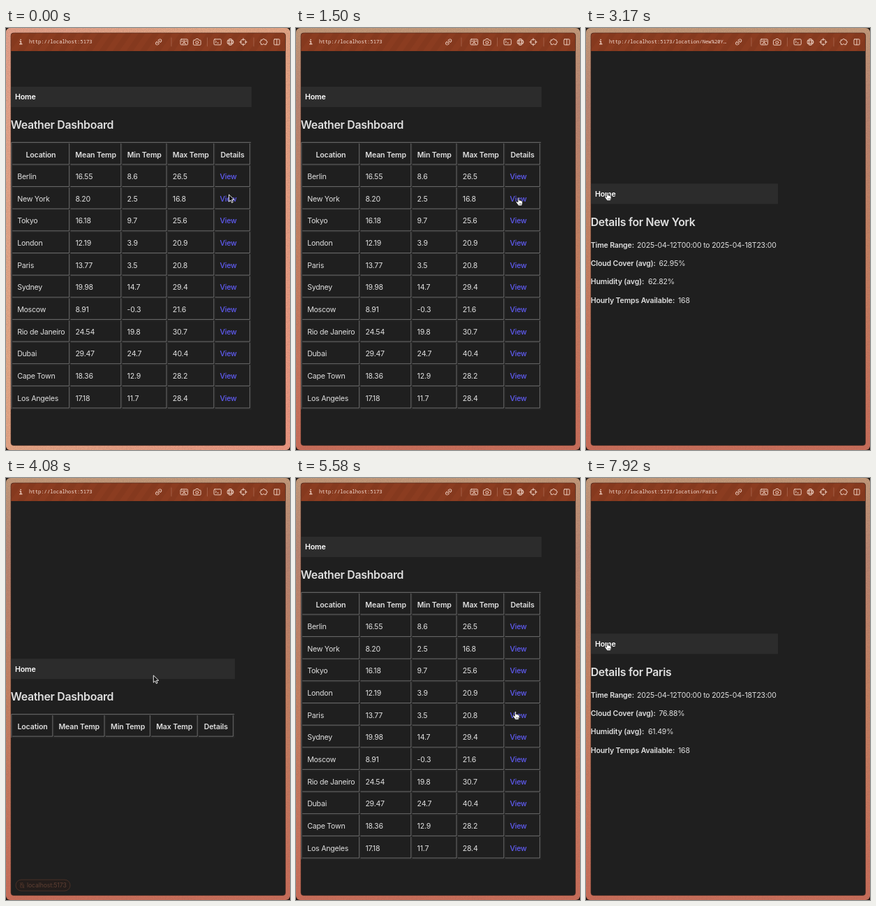
Animation, 407 px wide and 603 px high, one loop 8 s. Source, as an HTML page:

```html
<!DOCTYPE html>
<html lang="en">
<head>
<meta charset="utf-8">
<title>Weather Dashboard</title>
<style>
  html, body { margin: 0; width: 100%; height: 100%; overflow: hidden; background: #161210; }
  svg { display: block; width: 407px; height: 603px; }
  text { font-family: Inter, "Open Sans", sans-serif; font-size: 10.56px; fill: #e0e0e0; letter-spacing: -.02em; white-space: pre; }
  .bold { font-weight: 600; letter-spacing: -.012em; }
  .title { font-size: 15.84px; font-weight: 600; letter-spacing: -.018em; }
  .home { fill: #fff; }
  .link { fill: #605cf5; font-weight: 500; }
  .url { font: 7.2px "Noto Sans Mono", "DejaVu Sans Mono", monospace; letter-spacing: 0; fill: #f5ddd3; }
  .status text { font-size: 8.6px; letter-spacing: -.01em; fill: #a5634a; }
  .status rect, .status path { fill: none; stroke: #8a4d37; stroke-width: .8; }
  .icons { fill: none; stroke: #f0d3c6; stroke-width: .95; stroke-linecap: round; stroke-linejoin: round; }
  .light { stroke: #808080; stroke-width: .8; fill: none; }
  .dark { stroke: #2b2b2b; stroke-width: .7; fill: none; }
</style>
</head>
<body>
<svg id="stage" viewBox="0 0 407 603">
  <defs>
    <linearGradient id="frame" x2="0" y2="1">
      <stop offset="0" stop-color="#c39a7a"/>
      <stop offset=".18" stop-color="#b98672"/>
      <stop offset=".5" stop-color="#c48263"/>
      <stop offset="1" stop-color="#c96d59"/>
    </linearGradient>
    <linearGradient id="glow" x2="1" y2="1">
      <stop offset="0" stop-color="#e3a08a"/>
      <stop offset=".4" stop-color="#e2a886"/>
      <stop offset="1" stop-color="#ea9580"/>
    </linearGradient>
    <pattern id="stripes" width="16" height="16" patternUnits="userSpaceOnUse" patternTransform="rotate(35)">
      <rect width="16" height="16" fill="#8b3c20"/>
      <rect width="8" height="16" fill="#85391e"/>
    </pattern>
    <filter id="grain" x="0" y="0" width="1" height="1">
      <feTurbulence type="fractalNoise" baseFrequency=".8" numOctaves="2" seed="4"/>
      <feColorMatrix values="0 0 0 0 .2  0 0 0 0 .1  0 0 0 0 .08  0 0 0 1.4 -.5"/>
    </filter>
    <clipPath id="window"><rect x="7" y="7" width="393.5" height="589.5" rx="4"/></clipPath>
  </defs>
  <rect width="407" height="603" rx="6" fill="url(#frame)"/>
  <rect id="bright" width="407" height="603" rx="6" fill="url(#glow)"/>
  <rect width="407" height="603" rx="6" filter="url(#grain)" opacity=".3"/>
  <g clip-path="url(#window)">
    <rect x="7" y="7" width="394" height="590" fill="#1f1f1f"/>
    <rect x="7" y="7" width="394" height="26" fill="url(#stripes)"/>
  </g>
  <rect x="7" y="7" width="393.5" height="589.5" rx="4" fill="none" stroke="#4a2a20" stroke-width=".6"/>
  <g class="icons">
    <path d="M20 18.8h1.3v4M19.6 22.9h3.4" stroke-width="1.2"/>
    <circle cx="21" cy="16.6" r=".4" stroke-width=".9"/>
    <g transform="translate(218.7 20) rotate(-45)">
      <path d="M-1 -2h-2a2 2 0 0 0 0 4h2M1 -2h2a2 2 0 0 1 0 4h-2M-2.2 0h4.4"/>
    </g>
    <path d="M237 14v12M288.5 14v12M355 14v12" stroke="#a9674e" stroke-width=".8"/>
    <rect x="250" y="16" width="10.5" height="8" rx="1.3"/>
    <circle cx="255.2" cy="19.2" r="1.3"/>
    <path d="M252.5 23a2.8 2 0 0 1 5.4 0M252 18v1.5M258.5 18v1.5"/>
    <path d="M269.5 17.3h1.8l1-1.8h3l1 1.8h1.8a1 1 0 0 1 1 1v5a1 1 0 0 1-1 1h-8.6a1 1 0 0 1-1-1v-5a1 1 0 0 1 1-1z"/>
    <circle cx="273.8" cy="20.6" r="1.9"/>
    <rect x="298" y="16" width="10.3" height="8" rx="1.2"/>
    <path d="M300 18.3l1.5 1.3-1.5 1.3M302.7 21.2h1.8"/>
    <circle cx="321.5" cy="20" r="4.4"/>
    <ellipse cx="321.5" cy="20" rx="2" ry="4.4"/>
    <path d="M317.6 18.3h7.8M317.6 21.7h7.8"/>
    <circle cx="340" cy="20" r="3.8"/>
    <path d="M340 14.8v3M340 22.2v3M334.8 20h3M342.2 20h3"/>
    <path d="M365.5 17h2.2a1.5 1.5 0 0 1 3 0h2.2v1.6a1.5 1.5 0 0 1 0 3v2.1h-2.3a1.4 1.4 0 0 0-2.7 0h-2.4v-2.1a1.5 1.5 0 0 1 0-3z"/>
    <rect x="384" y="16" width="8" height="8" rx="1"/>
    <path d="M388 16v8"/>
  </g>
  <text id="url" class="url" x="33" y="22.4"></text>
  <g id="pages"></g>
  <g id="statuses"></g>
  <path id="arrow" d="M0 0v10.2l2.4-2.2 1.7 3.7 1.7-.8-1.6-3.6h3.3z" fill="#151515" stroke="#fff" stroke-width=".9" stroke-linejoin="round"/>
  <g id="hand" fill="#fff" stroke="#111" stroke-width=".7" stroke-linejoin="round">
    <path d="M-1 .6a.9.9 0 0 1 1.8 0v3.2q1.4-.6 1.7.5 1.3-.5 1.6.6 1.5-.3 1.5 1V8q0 1.3-.9 2.6v.9h-5.3v-.8L-3.4 7q-.8-1.6.4-1.7.8 0 2 1.4z"/>
    <path d="M1.1 8v2M2.5 8v2M3.9 8v2" stroke-width=".5"/>
  </g>
</svg>
<script>
const LOOP = 8000, PITCH = 31.64;
const $ = id => document.getElementById(id);

const cities = [
  ["Berlin", "16.55", "8.6", "26.5"], ["New York", "8.20", "2.5", "16.8"],
  ["Tokyo", "16.18", "9.7", "25.6"], ["London", "12.19", "3.9", "20.9"],
  ["Paris", "13.77", "3.5", "20.8"], ["Sydney", "19.98", "14.7", "29.4"],
  ["Moscow", "8.91", "-0.3", "21.6"], ["Rio de Janeiro", "24.54", "19.8", "30.7"],
  ["Dubai", "29.47", "24.7", "40.4"], ["Cape Town", "18.36", "12.9", "28.2"],
  ["Los Angeles", "17.18", "11.7", "28.4"]
];
const headers = ["Location", "Mean Temp", "Min Temp", "Max Temp", "Details"];

const text = (x, middle, content, cls = "", extra = "") =>
  `<text x="${x}" y="${middle + 3.8}" class="${cls}" ${extra}>${content}</text>`;

const header = (top, width, title) =>
  `<rect x="7" y="${top}" width="${width}" height="29" fill="#2c2c2c"/>` +
  text(13, top + 14.6, "Home", "bold home") +
  text(6.7, top + 56.4, title, "title");

function dashboard(top, rightEdges, rows) {
  const lefts = [9.2, ...rightEdges.slice(0, -1).map(x => x + 1.8)];
  const right = rightEdges.at(-1) + 1.7, tableTop = top + 79.4;
  const bottom = tableTop + 1.7 + PITCH * (rows.length + 1);
  let out = header(top, right - 6.2, "Weather Dashboard") +
    `<path class="light" d="M7.8 ${bottom}V${tableTop}H${right}"/>` +
    `<path class="dark" d="M7.8 ${bottom}H${right}V${tableTop}"/>`;
  [headers, ...rows.map(r => [...r, "View"])].forEach((row, i) => {
    const y = tableTop + 1.4 + i * PITCH, end = y + PITCH - 1.5, middle = top + 96.7 + i * PITCH;
    row.forEach((label, c) => {
      const a = lefts[c], b = rightEdges[c];
      out += `<path class="dark" d="M${a} ${end}V${y}H${b}"/><path class="light" d="M${a} ${end}H${b}V${y}"/>`;
      out += i
        ? text(a + 7, middle, label, c == 4 ? "link" : "")
        : text((a + b) / 2, middle, label, "bold", 'text-anchor="middle"');
    });
  });
  return out;
}

function details(city, cloud, humidity) {
  const lines = [
    ["Time Range:", 73, "2025-04-12T00:00 to 2025-04-18T23:00"],
    ["Cloud Cover (avg):", 104.5, cloud],
    ["Humidity (avg):", 89, humidity],
    ["Hourly Temps Available:", 132, "168"]
  ];
  return header(222.4, 268, "Details for " + city) + lines.map(([label, x, value], i) =>
    text(6.7, 309.8 + i * 26.4, label, "bold") + text(x, 309.8 + i * 26.4, value)).join("");
}

const host = "localhost:5173";
const full = { body: dashboard(84, [90.6, 164.8, 230, 297.8, 349.4], cities), url: host, home: 98.6, rows: true };
const loading = { body: dashboard(258.2, [66.8, 141, 206.4, 274.2, 325.6], []), url: host, home: 272.8 };
const newYork = { body: details("New York", "62.95%", "62.82%"), url: host + "/location/New%20Y…", home: 237 };
const paris = { body: details("Paris", "76.88%", "61.49%"), url: host + "/location/Paris", home: 237 };

const schedule = [[0, full], [2080, newYork], [3750, loading], [4340, full], [6420, paris]];
const pages = [full, newYork, loading, paris];
$("pages").innerHTML = pages.map(p => `<g>${p.body}</g>`).join("");
pages.forEach((p, i) => p.node = $("pages").children[i]);

// Link hints: label, pill width, fade-in start, fade-out start
const statuses = [
  [host + "/location/New%20York", 160, 1780, 2130],
  [host, 78, 3400, 3860],
  [host + "/location/Paris", 133, 5850, 6460]
];
$("statuses").innerHTML = statuses.map(([label, width]) => `<g class="status">
  <rect x="14" y="574" width="${width}" height="16" rx="8" style="fill:#2a1c17"/>
  <path d="M20.6 581h4.8v4h-4.8zM21.6 581v-1.2a1.4 1.4 0 0 1 2.8 0M20 578l6 8"/>
  <text x="30" y="585.1">${label}</text></g>`).join("");

// Pointer path: time, x, y
const route = [
  [0, 319.5, 238], [850, 319.5, 238], [1250, 319, 242.4], [2300, 319, 242.4],
  [2980, 30.5, 235.2], [3720, 30.5, 235.2], [4080, 211.3, 282], [4450, 290, 318],
  [5150, 314.5, 333.8], [6720, 314.5, 333.4], [7480, 30.5, 235.2], [LOOP, 30.5, 235.2]
];

const clamp = v => Math.max(0, Math.min(1, v));
const ease = v => v * v * (3 - 2 * v);

function pointerAt(t) {
  const i = route.findIndex(p => p[0] > t);
  const [t0, x0, y0] = route[i - 1], [t1, x1, y1] = route[i];
  const k = ease((t - t0) / (t1 - t0));
  return [x0 + (x1 - x0) * k, y0 + (y1 - y0) * k];
}

function overLink(page, x, y) {
  if (x > 12 && x < 44 && Math.abs(y - page.home) < 5.5) return true;
  if (!page.rows || x < 306 || x > 331) return false;
  const row = Math.round((y - 180.7) / PITCH);
  return row > 0 && row <= cities.length && Math.abs(y - 180.7 - row * PITCH) < 5.5;
}

function draw(t) {
  const page = schedule.findLast(([start]) => start <= t)[1];
  pages.forEach(p => p.node.style.display = p === page ? "" : "none");
  $("url").textContent = "http://" + page.url;
  $("bright").style.opacity = 1 - clamp((t - 80) / 700);

  statuses.forEach(([, , start, end], i) => {
    const shown = Math.min(clamp((t - start) / 200), 1 - clamp((t - end) / 420));
    $("statuses").children[i].style.opacity = shown;
  });

  const [x, y] = pointerAt(t), hover = overLink(page, x, y);
  for (const [id, visible] of [["arrow", !hover], ["hand", hover]]) {
    $(id).style.display = visible ? "" : "none";
    $(id).setAttribute("transform", `translate(${x} ${y})`);
  }
}

const begin = performance.now();
function tick() {
  draw((performance.now() - begin) % LOOP);
  requestAnimationFrame(tick);
}
tick();
</script>
</body>
</html>
```
